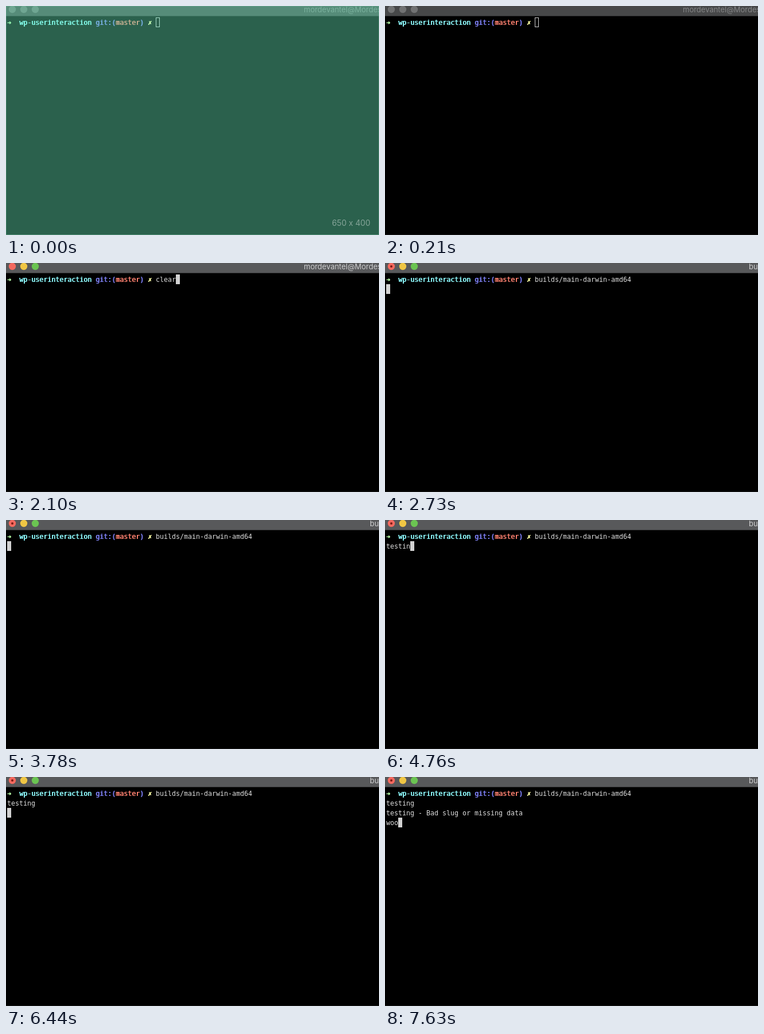
Write an HTML page with a canvas that moves like this. It is 650x400 px and loops after 8 s.

```html
<!DOCTYPE html>
<html lang="en">
<head>
<meta charset="utf-8">
<title>Terminal session</title>
<style>
  html, body { margin: 0; width: 650px; height: 400px; overflow: hidden; background: #000; }
  canvas { display: block; }
</style>
</head>
<body>
<canvas id="stage" width="650" height="400"></canvas>
<script>
const ctx = document.getElementById('stage').getContext('2d');
const W = 650, H = 400, LOOP = 8000;
const COL = 7, ROW = 17, LEFT = 2, TOP = 20;
const MONO = '11.63px "DejaVu Sans Mono", monospace';
const SANS = 'Inter, sans-serif';
const FG = '#dcdcdc';
const PROMPT_END = 37;
const COMMAND = 'builds/main-darwin-amd64';

// Event times in ms
const T = { reveal: 210, focus: 350, clear: 1470, cleared: 2170, recall: 2380,
            command: 2520, run: 2730, enter: 4900, reply: 6720 };
const TESTING = [4200, 4270, 4410, 4480, 4620, 4690, 4830];
const WOO = [7350, 7490, 7630];

const PROMPT = [
  [0, '➜', '#b4f7a4'],
  [3, 'wp-userinteraction', '#8ffcff'],
  [22, 'git:(', '#8284ff'],
  [27, 'master', '#ff8170'],
  [33, ')', '#8284ff'],
  [35, '✗', '#fdffa6']
];

function typed(word, times, t) {
  return word.slice(0, times.filter(at => t >= at).length);
}

// Bold is a second strike slightly to the right
function put(col, row, str, color = FG, bold = false) {
  const x = LEFT + col * COL, y = TOP + row * ROW + 13;
  ctx.font = MONO;
  ctx.fillStyle = color;
  ctx.fillText(str, x, y);
  if (bold) ctx.fillText(str, x + 0.7, y);
}

function disc(x, y, r, color) {
  ctx.fillStyle = color;
  ctx.beginPath();
  ctx.arc(x, y, r, 0, Math.PI * 2);
  ctx.fill();
}

function drawBar(focused, running) {
  ctx.fillStyle = focused ? '#58595b' : '#474849';
  ctx.fillRect(0, 0, W, 17);
  ctx.fillStyle = focused ? '#333435' : '#2b2c2d';
  ctx.fillRect(0, 17, W, 1);
  const lights = focused ? ['#f4695f', '#f0c644', '#6bc452'] : ['#717273', '#717273', '#717273'];
  lights.forEach((c, i) => disc(11 + i * 20, 6, 6.2, c));
  if (running) disc(11, 6, 2, '#7c1c16');
  ctx.font = '13px ' + SANS;
  ctx.fillStyle = focused ? '#cfcfd0' : '#858687';
  ctx.fillText(running ? 'builds/main' : 'mordevantel@Mordes-M', running ? 634 : 519, 11);
}

function drawCursor(col, row, solid) {
  const x = LEFT + col * COL, y = TOP + row * ROW;
  if (solid) {
    ctx.fillStyle = '#d2d2d2';
    ctx.fillRect(x, y, COL, ROW);
  } else {
    ctx.strokeStyle = '#d2d2d2';
    ctx.lineWidth = 1;
    ctx.strokeRect(x + 0.5, y + 0.5, COL - 1, ROW - 1);
  }
}

function drawOverlay() {
  ctx.fillStyle = 'rgba(107, 243, 193, 0.4)';
  ctx.fillRect(0, 0, W, H);
  ctx.strokeStyle = 'rgba(110, 190, 155, 0.35)';
  ctx.lineWidth = 1;
  ctx.strokeRect(0.5, 0.5, W - 1, H - 1);
  ctx.font = '13.8px ' + SANS;
  ctx.fillStyle = 'rgba(255, 255, 255, 0.43)';
  ctx.textAlign = 'right';
  ctx.fillText('650 x 400', 635, 384);
  ctx.textAlign = 'left';
}

function commandAt(t) {
  if (t >= T.command) return COMMAND;
  if (t >= T.recall) return 'clear';
  return t >= T.clear && t < T.cleared ? 'clear' : '';
}

function draw(t) {
  const focused = t >= T.focus, running = t >= T.run;
  ctx.fillStyle = '#000';
  ctx.fillRect(0, 0, W, H);
  ctx.fillStyle = '#161616';
  ctx.fillRect(0, H - 1, W, 1);
  drawBar(focused, running);

  for (const [col, str, color] of PROMPT) put(col, 0, str, color, true);
  const command = commandAt(t);
  put(PROMPT_END, 0, command);

  let col = PROMPT_END + command.length, row = 0;
  if (running) {
    const word = typed('testing', TESTING, t);
    put(0, 1, word);
    col = word.length;
    row = 1;
  }
  if (t >= T.enter) {
    col = 0;
    row = 2;
  }
  if (t >= T.reply) {
    put(0, 2, 'testing - Bad slug or missing data');
    const word = typed('woo', WOO, t);
    put(0, 3, word);
    col = word.length;
    row = 3;
  }
  drawCursor(col, row, focused);
  if (t < T.reveal) drawOverlay();
}

const start = performance.now();
function tick() {
  draw((performance.now() - start) % LOOP);
  requestAnimationFrame(tick);
}
tick();
</script>
</body>
</html>
```
